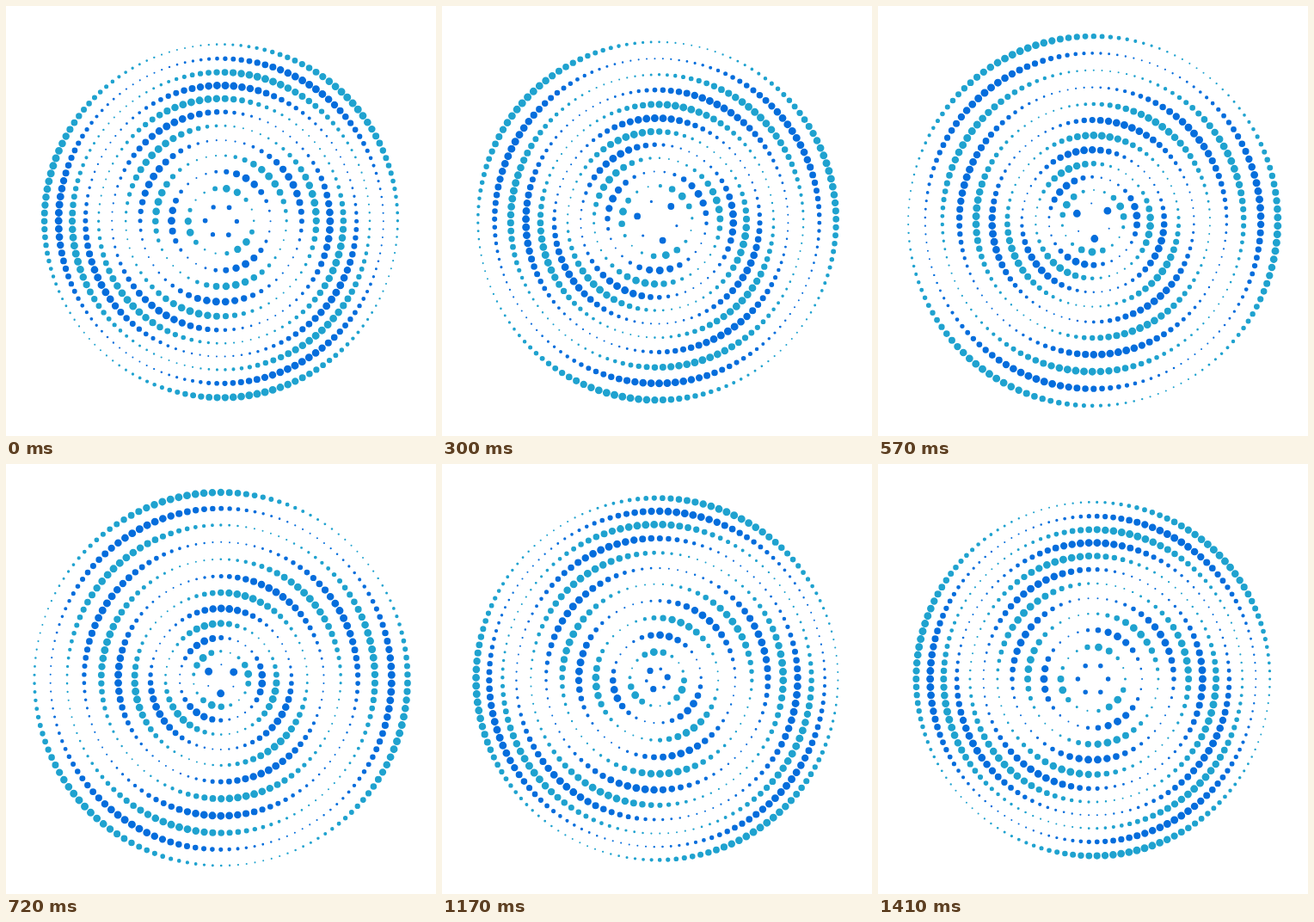
Recreate the animation shown at these times as an HTML page with a canvas. Size 500x500 px, loop 1440 ms.

```html
<!DOCTYPE html>
<html lang="en">
<head>
<meta charset="utf-8">
<title>Dot rings</title>
<style>
  html, body { margin: 0; width: 100%; height: 100%; overflow: hidden; background: #fff; }
  canvas { display: block; }
</style>
</head>
<body>
<canvas width="500" height="500"></canvas>
<script>
const ctx = document.querySelector('canvas').getContext('2d');
const TAU = 2 * Math.PI;
const LOOP = 1440, STEP = 30;
const RINGS = 12, GAP = 17.6, SWELL = 6;
const COLORS = ['#056ddc', '#1fa2cf'];

function drawRing(i, turn) {
  const count = 6 + 12 * i;
  const radius = GAP * (i + 1) + SWELL * Math.sin(turn + i * TAU / 16);
  // Each ring advances by one dot per loop, in alternating directions.
  const spin = (i % 2 ? -turn : turn) / count;
  ctx.fillStyle = COLORS[i % 2];
  ctx.beginPath();
  for (let j = 0; j < count; j++) {
    const angle = TAU * j / count + spin;
    const size = 2.75 + 1.75 * Math.sin(3 * angle - turn - i * TAU / 8);
    const x = 250 + radius * Math.cos(angle);
    const y = 250 + radius * Math.sin(angle);
    ctx.moveTo(x + size, y);
    ctx.arc(x, y, size, 0, TAU);
  }
  ctx.fill();
}

function draw(ms) {
  const turn = TAU * (Math.floor(ms / STEP) + 1) * STEP / LOOP;
  ctx.clearRect(0, 0, 500, 500);
  for (let i = 0; i < RINGS; i++) drawRing(i, turn);
}

const start = performance.now();
function tick() {
  draw((performance.now() - start) % LOOP);
  requestAnimationFrame(tick);
}
tick();
</script>
</body>
</html>
```
